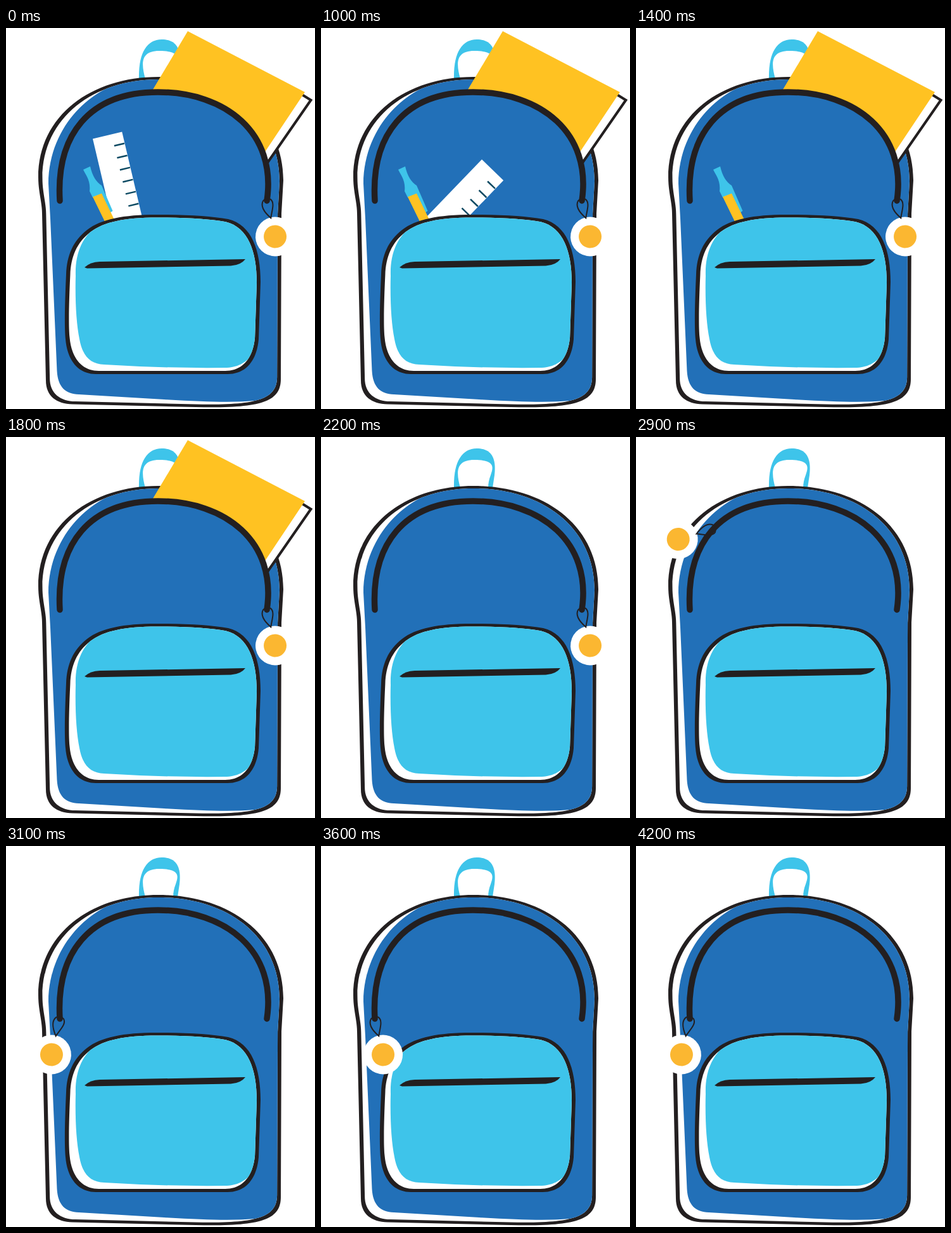
Write an HTML page that moves like this. It is 488 by 600 pixels and loops after 5.2 s.

```html
<!DOCTYPE html>
<html lang="en">
<head>
<meta charset="utf-8">
<title>Backpack</title>
<style>
  html, body { margin: 0; width: 100%; height: 100%; overflow: hidden; background: #fff; }
  svg { display: block; width: 488px; height: 600px; }
  .ink { fill: #231f20; }
  .blue { fill: #2270b8; }
  .cyan { fill: #3ec4ea; }
  .gold { fill: #ffc222; }
  .white { fill: #fff; }
  .line { fill: none; stroke: #231f20; }
</style>
</head>
<body>
<svg viewBox="0 0 488 600">
  <path class="cyan" d="M210 80C209 40 222 18 246 18C270 18 277 34 274 60L271 80Z"/>
  <path class="white" d="M220 80C214 58 211 36 242 36C276 36 272 48 268 60Q264 70 264 80Z"/>

  <g id="bag"></g>

  <g id="book">
    <path class="white" d="M468 103L482 113L395 238L380 231Z"/>
    <path class="line" stroke-width="4" d="M466 104L481.500 113.500L395 238"/>
    <path class="gold" d="M287 5L472 101L385 231L214 127Z"/>
  </g>

  <path id="zipper" class="blue" stroke="#231f20" stroke-width="9.500" stroke-linecap="round"
    d="M85 272C79 170 130 101 240 101C347 101 428 165 412 272"/>

  <g id="ruler">
    <path class="white" d="M0 0H47.500V140H0Z"/>
    <path id="ticks" fill="none" stroke="#0d4a63" stroke-width="2.500"/>
  </g>

  <g id="pen">
    <path class="cyan" d="M122 223L133 218Q138 240 151 248L168.500 288L163 292L149 262L137 267L132 257C134 240 126 232 122 223Z"/>
    <path class="gold" d="M137 266L151 260.500L176 312L162 317Z"/>
  </g>

  <g id="pocket"></g>
  <path class="ink" d="M124 377Q133 368.500 148 368L378 364Q371 373.500 355 374.500L128 378.500Z"/>

  <g id="tag">
    <circle class="white" cy="58" r="31"/>
    <path class="line" stroke-width="2" d="M0 28C-8 17 -12 6 -6 -1Q0 -5 6 -1C12 6 4 17 0 28Z"/>
    <circle cy="58" r="18" fill="#fbb731"/>
  </g>
</svg>
<script>
const LOOP = 5200, BEAT = 200, SWING = 13;
const el = id => document.getElementById(id);
const clamp = (v, lo, hi) => Math.min(hi, Math.max(lo, v));

function add(parent, tag, attrs) {
  const node = document.createElementNS('http://www.w3.org/2000/svg', tag);
  for (const key in attrs) node.setAttribute(key, attrs[key]);
  return parent.appendChild(node);
}

// Hand-drawn panel: the rim is the edge minus a squeezed copy of it, the paint sits off-register inside.
function panel(id, edge, paint, color, [left, top, right, bottom]) {
  const box = add(el(id), 'path', { d: edge, class: 'ink' }).getBBox();
  const sx = 1 - (left + right) / box.width, sy = 1 - (top + bottom) / box.height;
  const transform = `translate(${box.x + left} ${box.y + top}) scale(${sx} ${sy}) translate(${-box.x} ${-box.y})`;
  add(el(id), 'path', { d: edge, class: 'white', transform });
  add(add(el(id), 'clipPath', { id: id + 'Clip' }), 'path', { d: edge, transform });
  add(el(id), 'path', { d: paint, class: color, 'clip-path': `url(#${id}Clip)` });
}

panel('bag',
  'M240 77C136 77 51 137 51 235C51 258 57 275 57 292L63 555C63 580 80 592 105 592.5L300 597C400 599 434 590 434 553L435 292L438 240C438 140 354 77 240 77Z',
  'M195 70V83C140 92 68 150 67 245L70 300L80.5 540C82 566 94 576 115 577L250 585Q395 594 421 581L500 500V70Z',
  'blue', [6.5, 4, 6, 4.5]);
panel('pocket',
  'M238 294C185 294 150 301 128 318C106 335 96 358 95 388C93 430 92 470 94 490C97 525 115 545 142 545H350C378 545 396 525 399 490L402 400C402 350 388 310 351 301Q310 294 238 294Z',
  'M147 290V309C120 328 109 355 110 390C109 430 111 465 116 490C121 517 133 529 155 530Q250 536 345 535C366 535 378 527 388 516L420 490V290Z',
  'cyan', [6.5, 4.5, 6, 5]);

el('ticks').setAttribute('d',
  Array.from({ length: 6 }, (_, i) => `M30.5 ${18.5 + i * 19.5}H47`).join(''));

const zipper = el('zipper'), zipLength = zipper.getTotalLength();

function place(id, x, y, angle = 0) {
  el(id).setAttribute('transform', `translate(${x} ${y}) rotate(${angle})`);
}

// Beats passed since a prop began to drop; it is gone after the last one.
function drop(id, t, start, last) {
  const n = clamp(Math.floor((t - start) / BEAT) + 1, 0, last);
  el(id).setAttribute('display', n < last ? 'inline' : 'none');
  return n;
}

const rulerPoses = [[137, 174.5, -13.3], [254, 207, 44], [296, 272, 78]];

function drawTag(t) {
  const ride = clamp(Math.floor((t - 2300) / 100), 0, 8) / 8;
  const swings = clamp(Math.floor((t - 3400) / BEAT), 0, 4);
  const p = zipper.getPointAtLength(zipLength * (1 - ride));
  const whip = 23 * Math.sin(2 * Math.PI * ride) ** 3;
  const turn = -SWING - (360 - 2 * SWING) * ride + whip;
  place('tag', p.x, p.y, swings % 2 ? -SWING : turn);
}

function draw(t) {
  const r = drop('ruler', t, 1000, 3);
  if (r < 3) place('ruler', ...rulerPoses[r]);
  const p = drop('pen', t, 1600, 2);
  place('pen', 20 * p, 40 * p);
  const b = drop('book', t, 2000, 2);
  place('book', -30 * b, 40 * b);
  drawTag(t);
}

const start = performance.now();
function tick() {
  draw((performance.now() - start) % LOOP);
  requestAnimationFrame(tick);
}
tick();
</script>
</body>
</html>
```
